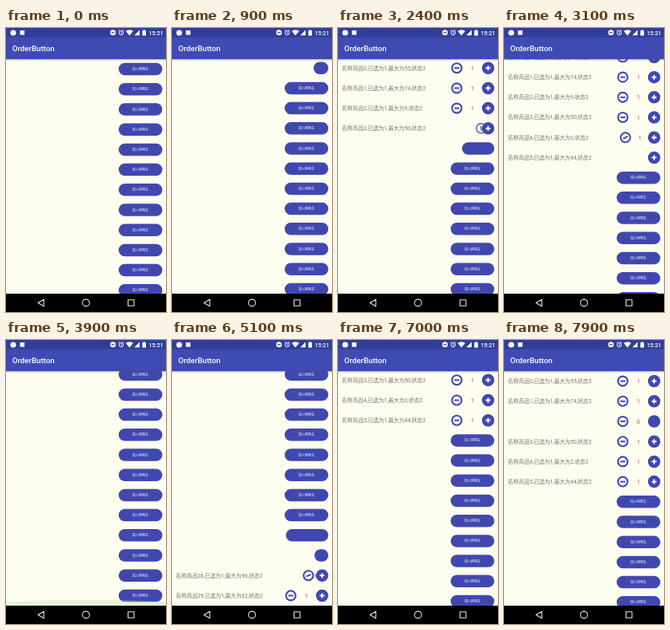
An HTML page that plays this animation: 200 px wide and 356 px high, repeating every 8 s.

```html
<!DOCTYPE html>
<html lang="zh">
<head>
<meta charset="utf-8">
<title>OrderButton</title>
<style>
html, body { margin: 0; width: 100%; height: 100%; overflow: hidden; background: #000; }
svg { display: block; width: 100%; height: 100%; }
text { font-family: Roboto, "Noto Sans CJK SC", "Noto Sans CJK", sans-serif; }
.info { font-size: 6.8px; fill: #777770; }
.label { font-size: 4px; font-weight: 500; fill: #fff; text-anchor: middle; }
.count { font-size: 7.2px; fill: #c9506c; text-anchor: middle; }
.line { fill: none; stroke: #e8e8d8; stroke-width: 1.1; stroke-linejoin: round; }
</style>
</head>
<body>
<svg id="stage" viewBox="0 0 200 356">
  <defs>
    <linearGradient id="shade" x2="0" y2="1">
      <stop offset="0" stop-color="#445" stop-opacity=".4"/>
      <stop offset="1" stop-color="#445" stop-opacity="0"/>
    </linearGradient>
    <clipPath id="view"><rect y="39" width="200" height="294"/></clipPath>
  </defs>
  <rect width="200" height="356" fill="#fdfdf0"/>
  <g clip-path="url(#view)">
    <g id="list"></g>
    <path id="glow" d="M0 333V328Q100 323 200 328V333Z" fill="#b8e0a8"/>
  </g>
  <rect y="39" width="200" height="2.2" fill="url(#shade)"/>
  <rect width="200" height="39" fill="#3f4bb2"/>
  <rect width="200" height="11.5" fill="#303f97"/>
  <text x="7.8" y="29" font-size="9.7" font-weight="500" fill="#fff">OrderButton</text>
  <g fill="#fff">
    <circle cx="9" cy="6" r="3.6"/>
    <rect x="17.5" y="3" width="5.6" height="5.6"/>
    <circle cx="133.7" cy="5.8" r="3.5" fill="#fff8dc"/>
    <path d="M131.8 5.8h3.8" stroke="#303f97" stroke-width="1.2"/>
    <g fill="none" stroke="#fff" stroke-width=".9">
      <circle cx="144" cy="6.1" r="2.7"/>
      <path d="M144 4.5V6.3L145.2 7M140.8 3.7L142.4 2.3M147.2 3.7L145.6 2.3"/>
    </g>
    <path d="M149.6 3.8Q154.3.8 159 3.8L154.3 9.4Z"/>
    <path d="M160.4 9.2L167 2.6V9.2Z"/>
    <path d="M170.4 3.2h1.3v-.9h2v.9h1.3v6.2h-4.6Z"/>
    <text x="178.4" y="8.7" font-size="7.2" font-weight="500">15:21</text>
  </g>
  <rect y="333" width="200" height="23" fill="#000"/>
  <path class="line" d="M40 344.5L47.2 340.2V348.8Z"/>
  <circle class="line" cx="100" cy="344.5" r="4.4"/>
  <rect class="line" x="152.6" y="340.8" width="7.4" height="7.4"/>
</svg>
<script>
const LOOP = 8000, PHASE = 500, PITCH = 25.2, ROWS = 30, END = 462;
const INK = "#4048b0", RIGHT = 195.4, SIZE = 15.5, WIDE = 54.6;
const PLUS_X = 187.6, MINUS_X = 148.5;

// row: [tap time, maximum, time the count returns to zero]
const orders = {
  0: [490, 55], 1: [1000, 74], 2: [1400, 9, 7890], 3: [1745, 50],
  4: [2195, 2], 5: [2593, 44],
  29: [4050, 62], 28: [4371, 96], 27: [4671, 35], 26: [5036, 18],
  25: [5400, 81], 24: [5830, 7]
};

// [start, end, offset reached]
const scrolls = [[700, 900, 1.4], [3030, 3672, END], [6730, 7100, 0]];

const clamp = v => Math.max(0, Math.min(1, v));
const smooth = v => (1 - Math.cos(Math.PI * clamp(v))) / 2;

function add(parent, tag, attrs = {}, text = "") {
  const el = document.createElementNS("http://www.w3.org/2000/svg", tag);
  set(el, attrs);
  el.textContent = text;
  return parent.appendChild(el);
}

function set(el, attrs) {
  for (const key in attrs) el.setAttribute(key, attrs[key]);
}

function show(el, on) {
  el.style.display = on ? "" : "none";
}

const list = document.getElementById("list");
const glow = document.getElementById("glow");

function makeRow(i) {
  const g = add(list, "g", { transform: `translate(0 ${51.6 + i * PITCH})` });
  const order = orders[i];
  const row = { order };
  if (order) {
    row.info = add(g, "text", { class: "info", x: 4.8, y: 2.4 },
      `名称商品${i},已选为1,最大为${order[1]},状态2`);
    row.count = add(g, "text", { class: "count", y: 2.6 }, "1");
    row.minus = add(g, "g");
    add(row.minus, "circle", { r: 6, fill: "#fdfdf0", stroke: INK, "stroke-width": 2.1 });
    add(row.minus, "path", { d: "M-3.1 0H3.1", stroke: INK, "stroke-width": 2 });
  }
  row.pill = add(g, "rect", {
    x: RIGHT - WIDE, y: -SIZE / 2, width: WIDE, height: SIZE, rx: SIZE / 2, fill: INK
  });
  row.label = add(g, "text", { class: "label", x: 168.1, y: 1.5 }, "加入购物车");
  if (order) {
    row.plus = add(g, "path", {
      d: `M${PLUS_X - 3} 0h6M${PLUS_X} -3v6`, stroke: "#fff", "stroke-width": 1.8
    });
  }
  return row;
}

const rows = Array.from({ length: ROWS }, (_, i) => makeRow(i));

function drawRow(row, t) {
  const [tap, , reset = LOOP] = row.order;
  const undone = t >= reset;
  const fold = smooth((t - tap) / PHASE);
  const out = undone ? 1 - smooth((t - reset) / PHASE) : smooth((t - tap - PHASE) / PHASE);
  const open = t >= tap + PHASE;
  const width = WIDE + (SIZE - WIDE) * fold;
  const x = PLUS_X + (MINUS_X - PLUS_X) * out;
  const opacity = clamp(out * 3);
  set(row.pill, { x: RIGHT - width, width });
  show(row.label, t < tap);
  show(row.info, open && !undone);
  show(row.plus, open && !undone);
  show(row.minus, out > 0);
  show(row.count, out > 0);
  set(row.minus, { transform: `translate(${x} 0) rotate(${-360 * (1 - out)})`, opacity });
  set(row.count, { x: (x + PLUS_X) / 2, opacity });
  row.count.textContent = undone ? "0" : "1";
}

function offset(t) {
  let y = 0;
  for (const [start, end, to] of scrolls) y += (to - y) * smooth((t - start) / (end - start));
  return y;
}

function draw(t) {
  set(list, { transform: `translate(0 ${-offset(t)})` });
  for (const row of rows) if (row.order) drawRow(row, t);
  const flash = clamp((t - 3650) / 120) * clamp((4250 - t) / 300);
  set(glow, { opacity: 0.35 * flash });
}

const begin = performance.now();
function tick() {
  draw((performance.now() - begin) % LOOP);
  requestAnimationFrame(tick);
}
tick();
</script>
</body>
</html>
```
